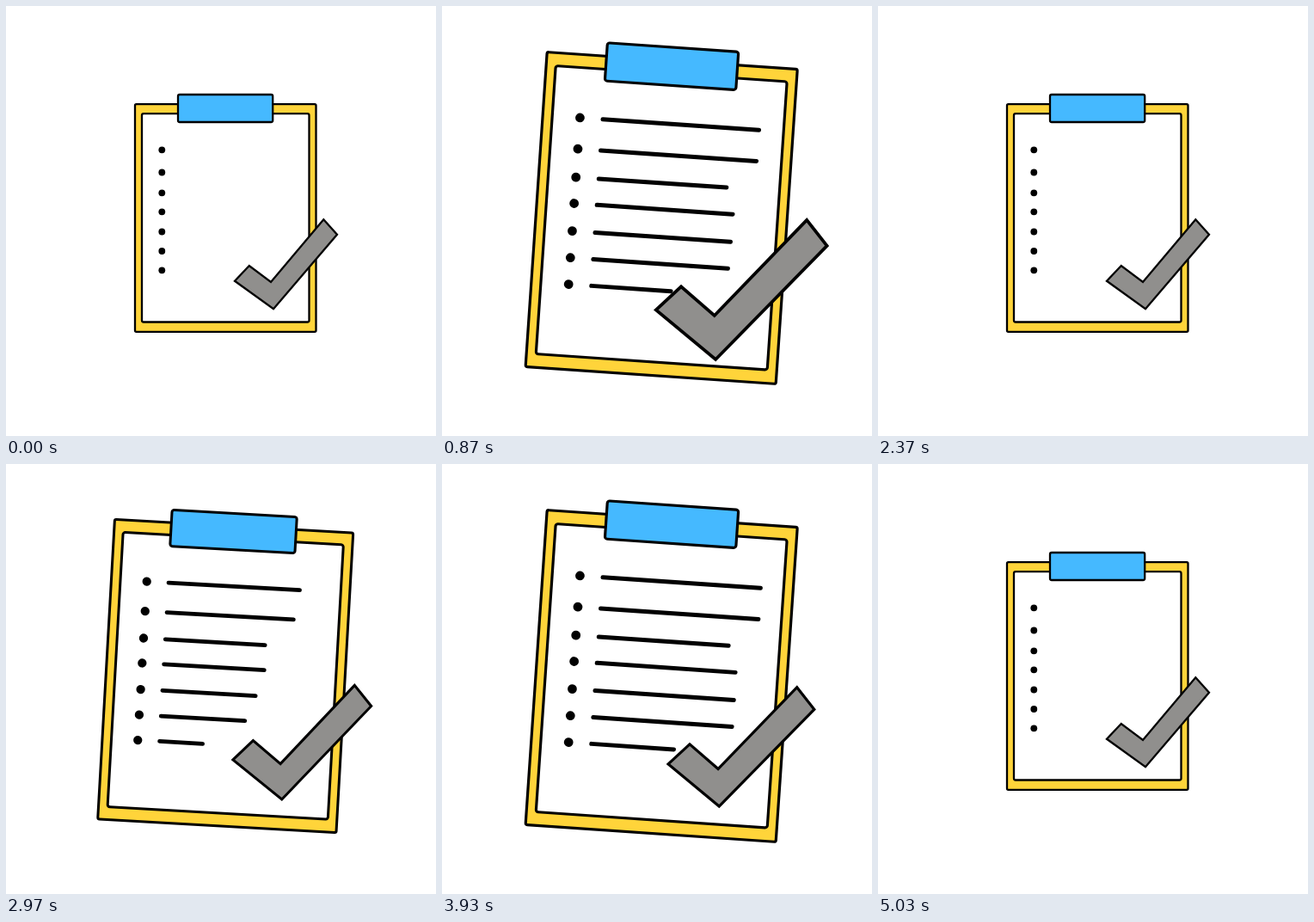
Animation of 500x500 px, one loop 5.07 s. Source, as an HTML page:

```html
<!DOCTYPE html>
<html lang="en">
<head>
<meta charset="utf-8">
<title>Checklist</title>
<style>
  html, body { margin: 0; width: 100%; height: 100%; overflow: hidden; background: #fff; }
  svg { display: block; width: 100vw; height: 100vh; }
</style>
</head>
<body>
<svg viewBox="0 0 500 500">
  <g id="board" stroke="#000" stroke-width="2.3">
    <rect x="150" y="114.2" width="210.5" height="264.6" rx="1.5" fill="#ffd43a"/>
    <rect x="158" y="125.2" width="194.5" height="242.3" rx="2" fill="#fff"/>
    <rect x="200" y="103" width="110.2" height="32" rx="2" fill="#45b9ff"/>
    <g id="rows" stroke-width="3.6" stroke-linecap="round"></g>
    <path id="check" fill="#908f8d" d="M266 319.8 L282.8 302 L308 321 L369.3 248.3 L385 265.7 L311 352.3 Z"/>
  </g>
</svg>
<script>
const LOOP = 5070;
const CYCLE = LOOP / 2;
const CENTER = [255.4, 246.5];
const CHECK_CENTER = [324.5, 297];
const LINE_X = 200.5;
const ROWS = [[167.3, 132.7], [193.5, 132.7], [217.3, 109.2], [239.3, 116.5],
              [262.5, 116.8], [285, 116.8], [307.3, 69.4]];

const board = document.getElementById("board");
const check = document.getElementById("check");
const rowGroup = document.getElementById("rows");

function add(tag, attrs) {
  const node = document.createElementNS("http://www.w3.org/2000/svg", tag);
  for (const name in attrs) node.setAttribute(name, attrs[name]);
  return rowGroup.appendChild(node);
}

const lines = ROWS.map(([y]) => {
  add("circle", { cx: 181.3, cy: y, r: 3.9, stroke: "none" });
  return add("line", { y1: y, y2: y });
});

const progress = (t, start, duration) => Math.min(1, Math.max(0, (t - start) / duration));
const smooth = u => (1 - Math.cos(Math.PI * u)) / 2;
const settle = (t, start, tau) => t < start ? 0 : 1 - Math.exp((start - t) / tau);

// cubic-bezier(.25, .1, .25, 1)
function ease(x) {
  let low = 0, high = 1;
  for (let i = 0; i < 24; i++) {
    const mid = (low + high) / 2;
    if (0.75 * mid * (1 - mid) + mid ** 3 < x) low = mid; else high = mid;
  }
  const s = (low + high) / 2;
  return 0.3 * (1 - s) ** 2 * s + 3 * (1 - s) * s * s + s ** 3;
}

function place(node, [x, y], scale, angle) {
  node.setAttribute("transform",
    `translate(${x} ${y}) rotate(${angle}) scale(${scale}) translate(${-x} ${-y})`);
}

function render(time) {
  const t = time % CYCLE;
  const grow = ease(progress(t, 15, 800)) - ease(progress(t, 1400, 950));
  const pulse = smooth(progress(t, 530, 350)) - smooth(progress(t, 930, 480));
  place(board, CENTER, 1 + 0.386 * grow, 3.92 * grow);
  place(check, CHECK_CENTER, 1 + 0.172 * pulse, 0);

  lines.forEach((line, i) => {
    const length = ROWS[i][1];
    const from = length * settle(t, 1559 + 37 * i, 110);
    const to = length * settle(t, 75 + 37 * i, 175);
    line.setAttribute("x1", LINE_X + from);
    line.setAttribute("x2", LINE_X + to);
    line.setAttribute("visibility", to - from > 0.8 ? "visible" : "hidden");
  });
}

const begin = performance.now();
function tick() {
  render((performance.now() - begin) % LOOP);
  requestAnimationFrame(tick);
}
tick();
</script>
</body>
</html>
```
